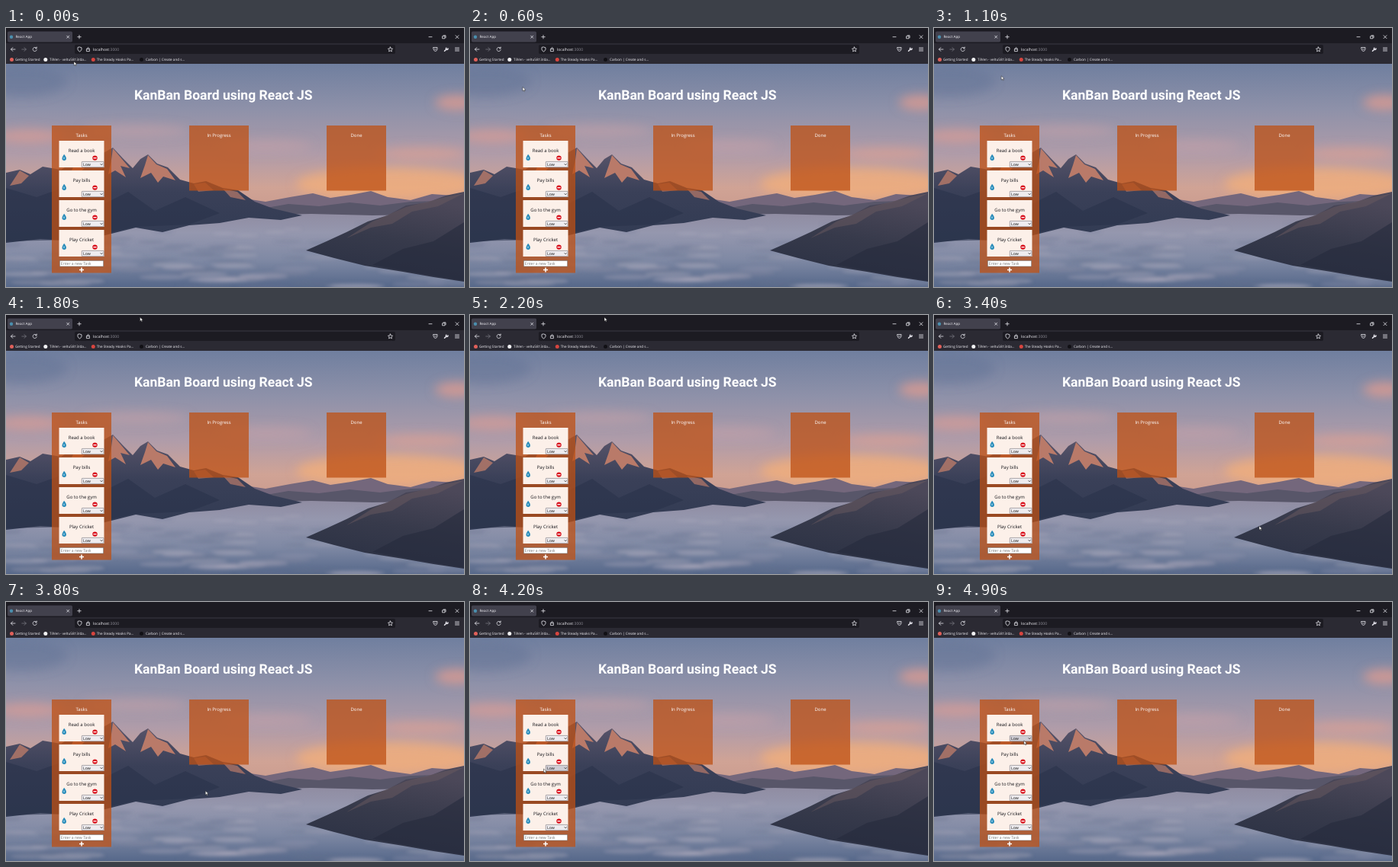
An HTML page for the animation above (5 s loop, 600 by 340 pixels).

```html
<!DOCTYPE html>
<html lang="en">
<head>
<meta charset="utf-8">
<title>KanBan Board</title>
<style>
html, body { margin: 0; width: 100%; height: 100%; overflow: hidden; background: #1c1b22; }
svg { display: block; width: 600px; height: 340px; }
text { font-family: "Open Sans", "Noto Sans", sans-serif; text-rendering: geometricPrecision; }
.title { font: 700 17.5px Roboto, sans-serif; fill: #fff; }
.ui { font-size: 4.6px; fill: #f4f3f8; }
.head { font-size: 6px; fill: #fff; text-anchor: middle; }
.task { font-size: 6px; fill: #15151a; text-anchor: middle; }
.line { fill: none; stroke: #e8e7ee; stroke-width: .8; stroke-linecap: round; stroke-linejoin: round; }
</style>
</head>
<body>
<svg viewBox="0 0 600 340">
  <defs>
    <linearGradient id="sky" x1="0" y1="47" x2="0" y2="245" gradientUnits="userSpaceOnUse">
      <stop offset="0" stop-color="#707f9f"/>
      <stop offset=".3" stop-color="#8e91a9"/>
      <stop offset=".6" stop-color="#b09ca9"/>
      <stop offset=".82" stop-color="#d0a395"/>
      <stop offset="1" stop-color="#c99a8d"/>
    </linearGradient>
    <linearGradient id="sea" x1="0" y1="238" x2="0" y2="340" gradientUnits="userSpaceOnUse">
      <stop offset="0" stop-color="#8f8a9f"/>
      <stop offset=".3" stop-color="#9597ae"/>
      <stop offset=".65" stop-color="#7f89a4"/>
      <stop offset="1" stop-color="#56688a"/>
    </linearGradient>
    <linearGradient id="rock" x1="0" y1="158" x2="0" y2="285" gradientUnits="userSpaceOnUse">
      <stop offset="0" stop-color="#5b566b"/>
      <stop offset=".45" stop-color="#3a4058"/>
      <stop offset="1" stop-color="#303a52"/>
    </linearGradient>
    <linearGradient id="slope" x1="520" y1="220" x2="500" y2="335" gradientUnits="userSpaceOnUse">
      <stop offset="0" stop-color="#4c4859"/>
      <stop offset=".5" stop-color="#373a4b"/>
      <stop offset="1" stop-color="#2b3144"/>
    </linearGradient>
    <filter id="soft" x="-30%" y="-80%" width="160%" height="260%"><feGaussianBlur stdDeviation="7"/></filter>
    <filter id="mist" x="-30%" y="-80%" width="160%" height="260%"><feGaussianBlur stdDeviation="2.2"/></filter>
    <clipPath id="page"><rect y="47" width="600" height="293"/></clipPath>
  </defs>

  <g clip-path="url(#page)">
    <rect y="47" width="600" height="293" fill="url(#sky)"/>
    <g filter="url(#soft)">
      <ellipse cx="500" cy="205" rx="120" ry="22" fill="#f0ae7c" opacity=".8"/>
      <ellipse cx="590" cy="98" rx="28" ry="10" fill="#d99a92" opacity=".85"/>
      <ellipse cx="545" cy="165" rx="60" ry="8" fill="#dda092" opacity=".7"/>
      <ellipse cx="30" cy="142" rx="45" ry="9" fill="#d59b98" opacity=".8"/>
      <ellipse cx="170" cy="135" rx="70" ry="7" fill="#c0a0a9" opacity=".7"/>
      <ellipse cx="340" cy="155" rx="60" ry="8" fill="#c3a1a8" opacity=".6"/>
      <ellipse cx="20" cy="70" rx="60" ry="20" fill="#647595" opacity=".5"/>
    </g>
    <path fill="#74677c" d="M300 222L340 228 372 222 402 217 425 223 452 219 478 214 500 222 530 226 558 218 600 221V260H300Z"/>
    <path fill="#585669" d="M330 238L370 231 410 234 450 229 490 233 530 228 600 226V270H330Z"/>
    <path fill="url(#sea)" d="M0 262L300 246 400 244 480 246 600 244V340H0Z"/>
    <g id="clouds" filter="url(#mist)"></g>
    <path fill="url(#rock)" d="M0 190L18 186 32 192 48 182 72 186 92 174 108 178 124 166 140 157 153 171 166 184 176 172 186 166 198 178 212 183 228 199 246 204 262 201 284 210 304 213 326 228 350 237 388 246 360 252 318 249 280 256 240 259 205 268 170 262 130 272 90 280 45 277 0 282Z"/>
    <g fill="#b97a69">
      <path d="M140 158L151 171 162 184 150 181 157 196 143 187 134 192 138 173Z"/>
      <path d="M186 167L197 179 211 185 222 200 206 195 199 203 190 190 176 197 182 180Z"/>
      <path d="M92 175L106 180 97 190 82 195Z"/>
      <path d="M18 187L30 194 20 204 5 207Z" opacity=".8"/>
      <path d="M284 211L303 215 314 226 294 222Z" opacity=".7"/>
      <path d="M246 205L261 203 272 213 252 215Z" opacity=".6"/>
    </g>
    <path fill="#28324a" opacity=".55" d="M0 210L40 222 80 208 120 235 160 215 195 240 235 222 280 243 240 258 170 261 90 278 0 280Z"/>
    <path fill="url(#slope)" d="M393 292L420 280 446 268 474 254 500 246 524 233 552 229 576 220 600 215V333L560 327 520 320 470 312 430 302Z"/>
    <path fill="#6a5a61" opacity=".5" d="M600 217L566 234 532 241 506 257 478 262 446 276 480 254 524 235 576 222Z"/>
    <path fill="#252a3c" opacity=".6" d="M600 255L560 280 520 290 480 311 540 322 600 332Z"/>
  </g>

  <text class="title" x="168" y="93.5">KanBan Board using React JS</text>
  <g id="board"></g>

  <rect width="600" height="20" fill="#1c1b22"/>
  <rect y="20" width="600" height="27" fill="#2b2a33"/>
  <rect x="2" y="4.5" width="85" height="14" rx="1.8" fill="#42414d"/>
  <circle cx="7" cy="11.7" r="2.2" fill="#4b8fae"/>
  <text class="ui" x="12.5" y="13.4">React App</text>
  <path class="line" d="M79.7 10.2l3 3m0-3l-3 3M93.8 11.7h4.4M96 9.5v4.4M554 11.7h4M589 9.7l4 4m0-4l-4 4M572 10.8h3v3h-3zM573 9.8h3v3"/>
  <path class="line" d="M12 28H6.5m2.3-2.4L6.5 28l2.3 2.4"/>
  <path class="line" style="stroke:#77767f" d="M20.8 28h5.5m-2.3-2.4l2.3 2.4-2.3 2.4"/>
  <path class="line" d="M39.8 26.3a2.6 2.6 0 1 0 .5 2.4M40.2 25v1.8h-1.8"/>
  <rect x="90" y="22" width="420" height="12" rx="1.8" fill="#1c1b22"/>
  <path class="line" d="M96.5 25l2.5 .8v2.4q-.4 1.7-2.5 2.8-2.1-1.1-2.5-2.8v-2.4zM105.8 27.6h3.6v3h-3.6zM106.4 27.4v-1q1.2-1.7 2.4 0v1"/>
  <text class="ui" x="114" y="29.9" style="font-size:5.05px">localhost<tspan fill="#8f8e98">:3000</tspan></text>
  <path class="line" d="M503.5 25l.9 1.9 2.1.3-1.5 1.5.4 2.1-1.9-1-1.9 1 .4-2.1-1.5-1.5 2.1-.3z"/>
  <path class="line" d="M560 25.5h5v2.3q-.5 2.4-2.5 2.7-2-.3-2.5-2.7zM561.4 27.3l1.1 1 1.1-1M588.5 26h5m-5 2h5m-5 2h5"/>
  <path class="line" style="stroke-width:1.5" d="M574.5 30.3l2.6-2.6m-.3-1.5a1.3 1.3 0 1 0 2.2.8"/>
  <g id="marks"></g>

  <path id="cursor" d="M0 0V5.2L1.3 4.1 2.1 5.9 3 5.5 2.2 3.8 3.8 3.6Z" fill="#fff" stroke="#222" stroke-width=".5"/>
</svg>
<script>
const $ = id => document.getElementById(id);

// Bookmarks: icon x, icon colour, text x, label
$("marks").innerHTML = [
  [7.5, "#e0605a", 12, "Getting Started"],
  [51.8, "#f2f2f5", 57, "TilVen - veltu5813/da..."],
  [114.3, "#d8453f", 118.7, "The Steady Hooks Pa..."],
  [177.5, "#111015", 183, "Carbon | Create and s..."]
].map(([cx, fill, x, label]) =>
  `<circle cx="${cx}" cy="41.6" r="2.5" fill="${fill}"/><text class="ui" x="${x}" y="43.2">${label}</text>`
).join("");

// Sea of clouds
let seed = 11;
const rnd = () => (seed = seed * 16807 % 2147483647) / 2147483647;
let puffs = "";
for (let i = 0; i < 110; i++) {
  const d = rnd(), fill = rnd() < .5 ? "#b0adbe" : "#67728f";
  puffs += `<ellipse cx="${rnd() * 600}" cy="${256 + d * 84}" rx="${10 + d * 26}" ry="${1.2 + d * 2.4}" fill="${fill}" opacity="${.2 + rnd() * .25}"/>`;
}
$("clouds").innerHTML = puffs;

// Board
const tasks = ["Read a book", "Pay bills", "Go to the gym", "Play Cricket"];
const cardY = i => 148 + i * 39;

const column = (x, h, label) =>
  `<rect x="${x}" y="128" width="78" height="${h}" fill="#be5014" opacity=".75"/>
   <text class="head" x="${x + 39}" y="142.6">${label}</text>`;

const card = (label, i) => `<g transform="translate(69.5 ${cardY(i)})">
  <rect width="59" height="35" fill="#fcf0e9"/>
  <text class="task" x="29.5" y="14.8">${label}</text>
  <path d="M6.6 17.8Q9.6 21.6 9.4 23.2A2.7 2.7 0 0 1 4 23.2Q4.1 21.3 6.6 17.8Z" fill="#2589b8"/>
  <path d="M6.5 20.8Q8 23 6.5 24.4 5 23.4 6.5 20.8Z" fill="#a9dcf0"/>
  <circle cx="47" cy="22.6" r="3.2" fill="#d8101c"/>
  <rect x="45" y="22" width="4" height="1.3" fill="#fff"/>
  <rect class="select" x="29.8" y="27.4" width="28.7" height="7.3" rx=".6" stroke="#77767c" stroke-width=".6"/>
  <text x="31.6" y="33" font-size="5.2" font-weight="500" fill="#111">Low</text>
  <path d="M54.2 30.3l1.4 1.5 1.4-1.5" fill="none" stroke="#222" stroke-width=".8"/>
</g>`;

$("board").innerHTML =
  column(60, 193.5, "Tasks") + column(240, 85.5, "In Progress") + column(420, 85.5, "Done") +
  tasks.map(card).join("") +
  `<rect x="70.3" y="305.3" width="57.4" height="7.7" fill="#fff" stroke="#77706d" stroke-width=".6"/>
   <text x="71.8" y="311" font-size="5.1" fill="#757575">Enter a new Task</text>
   <path d="M96 317.6h6M99 314.6v6" stroke="#fff" stroke-width="1.5"/>`;

const selects = [...document.querySelectorAll(".select")];

// Pointer path: time, x, y
const path = [
  [0, 89, 44], [400, 70, 75], [500, 70, 75], [600, 69, 77.5], [900, 72, 74],
  [1700, 175.5, 3], [2200, 176, 3], [2600, 375.5, 256], [3000, 415, 274],
  [3400, 426, 277], [4200, 96.5, 219], [4400, 98, 216], [4900, 117.8, 182]
];
const LOOP = 5000, STEP = 100;

function pointer(t) {
  let i = 0;
  while (i < path.length - 2 && t >= path[i + 1][0]) i++;
  const [t0, x0, y0] = path[i], [t1, x1, y1] = path[i + 1];
  const u = Math.min(1, (t - t0) / (t1 - t0)), k = u * u * (3 - 2 * u);
  return [x0 + (x1 - x0) * k, y0 + (y1 - y0) * k];
}

function draw(now) {
  const t = Math.floor(now % LOOP / STEP) * STEP;
  const [x, y] = pointer(t);
  $("cursor").setAttribute("transform", `translate(${x} ${y})`);
  selects.forEach((el, i) => {
    const top = cardY(i) + 27;
    const over = x > 96 && x < 129 && y > top - 1 && y < top + 9;
    el.setAttribute("fill", over ? "#cfcdd4" : "#eeecef");
  });
}

function tick() {
  draw(performance.now());
  requestAnimationFrame(tick);
}
tick();
</script>
</body>
</html>
```
